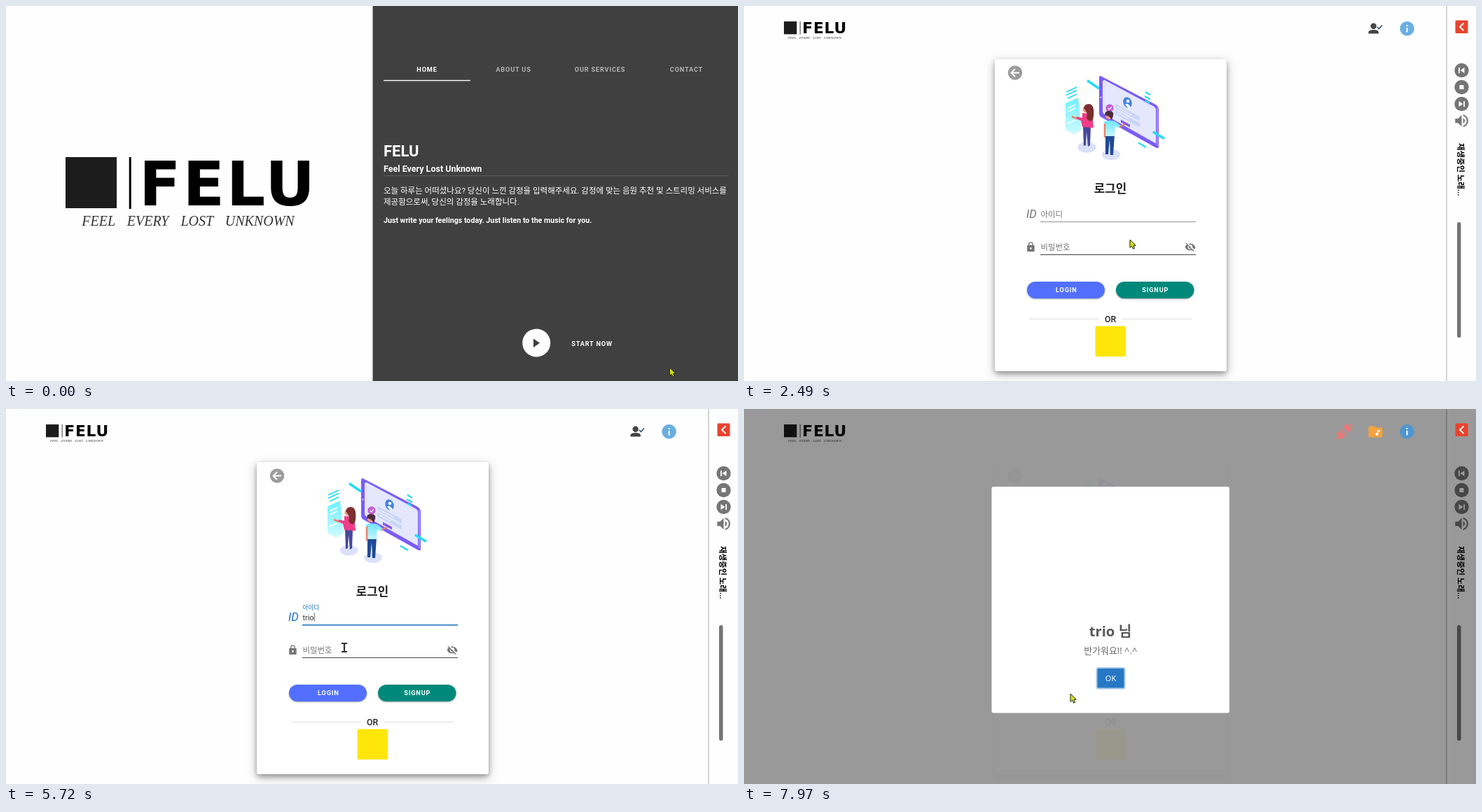
An HTML page that plays this animation: 1045x536 px, repeating every 8 s.

```html
<!DOCTYPE html>
<html lang="ko">
<head>
<meta charset="utf-8">
<title>Login walkthrough</title>
<style>
  html, body { margin: 0; width: 100%; height: 100%; overflow: hidden; background: #fefefe; }
  svg { display: block; width: 100%; height: 100%; }
  text { font-family: Roboto, "Noto Sans CJK KR", "Noto Sans CJK JP", sans-serif; white-space: pre; }
  .mid { text-anchor: middle; }
  .caps { font-size: 9.2px; font-weight: 700; letter-spacing: .089em; text-anchor: middle; fill: #fff; }
  .dim { fill: #b3b3b3; }
  .ko { font-size: 11.5px; }
  .label { font-size: 11.4px; }
  .typed { font-size: 10.8px; fill: #333; }
  .alert { font-family: "Noto Sans", "Noto Sans CJK KR", "Noto Sans CJK JP", sans-serif; text-anchor: middle; }
  .cyan { stroke: #22dcf5; fill: none; }
  #card { filter: drop-shadow(0 3px 3px rgba(0,0,0,.25)) drop-shadow(0 4px 7px rgba(0,0,0,.28)); }
  .btn { filter: drop-shadow(0 1px 1px rgba(0,0,0,.35)); }
</style>
</head>
<body>
<svg viewBox="0 0 1045 536" preserveAspectRatio="none">
  <defs>
    <linearGradient id="panel" x2="0" y2="1">
      <stop stop-color="#6cf0ff"/><stop offset="1" stop-color="#d2faff"/>
    </linearGradient>
    <linearGradient id="shirt" x2="0" y2="1">
      <stop stop-color="#6fe6fb"/><stop offset="1" stop-color="#c4f6fd"/>
    </linearGradient>
    <clipPath id="loginClip"><rect x="404" y="394" width="111" height="24" rx="12"/></clipPath>
    <g id="brand">
      <rect x="85" y="216" width="73" height="73" fill="#1c1c1c"/>
      <rect x="175.700" y="216" width="3" height="74"/>
      <text x="190" y="284.500" font-size="87" font-weight="700" letter-spacing="3"
        style="font-family:'DejaVu Sans',sans-serif">FELU</text>
      <text class="mid" x="260" y="314" font-size="20" font-style="italic" word-spacing="12" fill="#333"
        style="font-family:'Liberation Serif',serif">FEEL EVERY LOST UNKNOWN</text>
    </g>
  </defs>
  <rect width="1045" height="536" fill="#fefefe"/>

  <g id="landing">
    <use href="#brand"/>
    <rect x="523.500" y="-2" width="522" height="700" fill="#404040"/>
    <text class="caps" x="601" y="94">HOME</text>
    <text class="caps dim" x="724.500" y="94">ABOUT US</text>
    <text class="caps dim" x="848" y="94">OUR SERVICES</text>
    <text class="caps dim" x="971.500" y="94">CONTACT</text>
    <rect x="539" y="105.800" width="124" height="1.400" fill="#fff"/>
    <g fill="#fff">
      <text x="539" y="215" font-size="22" font-weight="700">FELU</text>
      <text x="539" y="237" font-size="12.500" font-weight="700">Feel Every Lost Unknown</text>
      <rect x="539" y="242" width="493" height="1" fill="#fff" opacity=".13"/>
      <text class="ko" x="539" y="267.500">오늘 하루는 어떠셨나요? 당신이 느낀 감정을 입력해주세요. 감정에 맞는 음원 추천 및 스트리밍 서비스를</text>
      <text class="ko" x="539" y="283.500">제공함으로써, 당신의 감정을 노래합니다.</text>
      <text x="539" y="310" font-size="10.650" font-weight="700">Just write your feelings today. Just listen to the music for you.</text>
      <circle cx="757.200" cy="481.500" r="20"/>
      <path d="M753 475.500v12.500l9-6.250z" fill="#404040"/>
    </g>
    <text class="caps" x="836.500" y="486.300">START NOW</text>
  </g>
  <path id="status" d="M0 533h111q3 0 3 3H0z" fill="#dedede"/>

  <g id="login">
    <rect id="card" x="358" y="76" width="331" height="446" rx="3" fill="#fff"/>
    <circle cx="387" cy="95.500" r="10.200" fill="#9c9c9c"/>
    <path d="M393 95.500H382M387 90l-5.500 5.500L387 101" fill="none" stroke="#fff" stroke-width="1.900"/>

    <g id="art">
      <g id="tablet">
        <path d="M510 100L587 140Q592 143 592 147V200Q592 204 588 202L511 159Q507 157 507 153V102Q507 98 510 100z" fill="#7a5cf5"/>
        <path d="M514 105L585 143Q588 145 588 148V196L515 155Q512 153 512 150V107z" fill="#e4e7fd"/>
        <path d="M590 145v54" stroke="#b4a5fb" stroke-width="1.500"/>
        <circle cx="509.500" cy="130" r="1" fill="#fff"/>
        <ellipse cx="547.500" cy="137.500" rx="6" ry="8" transform="rotate(-20 547.500 137.500)" fill="#4384e0"/>
        <circle cx="548" cy="135.500" r="2.300" fill="#fff"/>
        <path d="M544 140q4-3 8 4l-3 2z" fill="#fff"/>
        <path d="M530 139l35 19v6l-35-19zM530 148l35 19v6l-35-19z" fill="#c9d5f8"/>
        <path d="M533 144l20 11M533 152l16 9" stroke="#fff"/>
        <path d="M538 162l13 7v4l-13-7z" fill="#8457e8"/>
        <circle cx="522" cy="145.500" r="5.700" fill="#c45fd2"/>
        <path d="M519.500 145.500l2 2 3.500-4" fill="none" stroke="#fff" stroke-width="1.200"/>
      </g>
      <path class="cyan" stroke-width="3.500" d="M490 106.500l17 11.500M584 180l16 9.500"/>
      <path class="cyan" stroke-width="2.200" d="M573 123l7 4M572 129l8 4.500M573 135l6 3.500M563 195.500l11 6.500"/>
      <path class="cyan" stroke-width="1.800" d="M460 123l15-7M460 127.500l15-7M462 132l13-6"/>
      <g fill="#dbe0fb"><ellipse class="disc" cx="489.500" cy="202" rx="12" ry="7"/><ellipse class="disc" cx="524" cy="212.500" rx="12" ry="7"/></g>
      <path d="M459 139l18-8 5 46-11 7-12-7z" fill="url(#panel)"/>
      <path d="M462 146l11-5M462 151l11-5M462 168l11-5" stroke="#fff" stroke-width="1.500"/>
      <path d="M484 172h11l-1 27-3 2-2-21-1 19-3 1z" fill="#45479a"/>
      <path d="M483 153l14 1 2 20-16-1-2-9-7-3 1-3 8 2z" fill="#ef3d87"/>
      <path d="M475 161l-7-3" stroke="#e5856d" stroke-width="2.500"/>
      <circle cx="488" cy="148" r="4.500" fill="#f09c86"/>
      <path d="M485 146q1-6 7-6t7 8q1 6-1 15-5 4-9-3 2-6-1-10z" fill="#7d2f30"/>
      <path d="M516 184h13l-2 29h-4l-1-22-2 21h-4z" fill="#204a94"/>
      <path d="M514 165q8-3 16 0l8 6-2 4-6-3-1 14h-14z" fill="url(#shirt)"/>
      <path d="M536 173l8-4M515 168v20" stroke="#e5856d" stroke-width="2.500"/>
      <circle cx="521" cy="157" r="5" fill="#ee9680"/>
      <path d="M515 156q0-7 7-6t5 7l-2 6q-2-6-10-7z" fill="#4b2b3d"/>
    </g>

    <text class="mid" x="523" y="266.800" font-size="16.800" font-weight="700" fill="#222">로그인</text>

    <text id="idIcon" x="403" y="303.300" font-size="16.500" font-style="italic">ID</text>
    <text class="label" id="idLabel">아이디</text>
    <text class="typed" x="423.500" y="301.500" id="idText"><tspan></tspan><tspan></tspan></text>
    <path d="M423 308.500h222" stroke="#949494"/>
    <path id="idLine" stroke="#1b6fc0" stroke-width="1.600"/>

    <g id="pwIcons">
      <path transform="translate(401.500 336.500) scale(.66)" fill-rule="evenodd"
        d="M6 8h1V6a5 5 0 0 1 10 0v2h1a2 2 0 0 1 2 2v10a2 2 0 0 1-2 2H6a2 2 0 0 1-2-2V10a2 2 0 0 1 2-2zM9 8h6V6a3 3 0 0 0-6 0zM12 13a2 2 0 0 0 0 4 2 2 0 0 0 0-4z"/>
      <g transform="translate(629 336.500) scale(.66)">
        <path d="M1 12C3 7 7 4.500 12 4.500S21 7 23 12 17 19.500 12 19.500 3 17 1 12z"/>
        <circle cx="12" cy="12" r="5" fill="#fff"/><circle cx="12" cy="12" r="3"/>
        <path d="M4 2L22 20" stroke="#fff" stroke-width="2.500"/>
        <path d="M3.300 3L2 4.300 19.700 22 21 20.700z"/>
      </g>
    </g>
    <text class="label" id="pwLabel">비밀번호</text>
    <g id="dots"></g>
    <path id="pwRule" d="M423 355.500h222"/>
    <path id="pwLine" stroke="#1b6fc0" stroke-width="1.600"/>
    <rect id="caret" width=".8" height="12" fill="#333"/>

    <rect class="btn" id="loginBtn" x="404" y="394" width="111" height="24" rx="12"/>
    <circle id="ripple" cx="464.500" cy="406" fill="#fff" clip-path="url(#loginClip)"/>
    <text class="caps" x="460.400" y="409.300">LOGIN</text>
    <rect class="btn" x="531" y="394" width="111.500" height="24" rx="12" fill="#00897b"/>
    <text class="caps" x="587.300" y="409.300">SIGNUP</text>
    <path d="M407 447.500h99.500M540 447.500h99" stroke="#e0e0e0"/>
    <text class="mid" x="523.200" y="452.300" font-size="12.300" font-weight="500" fill="#222">OR</text>
    <rect x="501.500" y="457.500" width="43.500" height="43.500" rx="2" fill="#ffe60a"/>
  </g>

  <use id="smallBrand" href="#brand" transform="translate(35.700 -32.100) scale(.2507)"/>

  <g id="sidebar">
    <rect x="1003" width="42" height="536" fill="#fefefe"/>
    <rect x="1002.500" width="1" height="536" fill="#a8a8a8"/>
    <g fill="#757575">
      <circle cx="1024.500" cy="92" r="10.200"/><circle cx="1024.500" cy="116" r="10.200"/><circle cx="1024.500" cy="140" r="10.200"/>
      <path transform="translate(1012.200 151.700) scale(1.030)"
        d="M14 3.200v2.100a7 7 0 0 1 0 13.400v2.100a9 9 0 0 0 0-17.600M16.500 12a4.500 4.500 0 0 0-2.500-4v8a4.500 4.500 0 0 0 2.500-4M3 9v6h4l5 5V4L7 9z"/>
      <rect x="1018" y="309" width="5.500" height="165" rx="2.500"/>
    </g>
    <g fill="#fff">
      <path d="M1020 88h1.800v8H1020zM1028.500 88v8l-6-4z"/>
      <rect x="1021.500" y="113" width="6" height="6"/>
      <path d="M1027.200 136h1.800v8h-1.800zM1020.500 136v8l6-4z"/>
    </g>
    <text transform="translate(1019.200 196) rotate(90)" font-size="11.400" font-weight="700">재생중인 노래...</text>
  </g>

  <rect id="shade" width="1045" height="536" fill="#000"/>

  <g id="icons">
    <rect x="1015.500" y="20.500" width="18" height="18.500" rx="1.500" fill="#e8432e"/>
    <path d="M1027.500 24.500l-5.500 5.300 5.500 5.300" fill="none" stroke="#fff" stroke-width="2"/>
    <circle id="info" cx="946.600" cy="32.300" r="10.300"/>
    <path d="M945.600 27h2v2h-2zM945.600 31h2v6.500h-2z" fill="#fff"/>
    <g id="guest" fill="#454545">
      <circle cx="898.700" cy="28.800" r="4.200"/>
      <path d="M891.500 39.500v-2q0-3.500 7.200-3.500t7.200 3.500v2z"/>
      <path d="M904 30l2.500 2.500 4.500-5" fill="none" stroke="#3a5568" stroke-width="1.700"/>
    </g>
    <g id="member">
      <g transform="translate(856.500 32.300) rotate(-45) scale(1.080)" fill="#e57878">
        <path d="M-14 -1h4v2h-4zM10 -1h4v2h-4zM-10 -3q0-2 2-2h5v10h-5q-2 0-2-2zM10 -3q0-2-2-2H3v10h5q2 0 2-2zM-3 -3.500h4v2h-4zM-3 1.500h4v2h-4z"/>
      </g>
      <path d="M893.500 24.500h6l2 2h8q2 0 2 2v10q0 2-2 2h-16q-2 0-2-2v-12q0-2 2-2z" fill="#f2a340"/>
      <path d="M904 30h4v2h-2.500v4a2 2 0 1 1-1.500-2z" fill="#fff"/>
    </g>
  </g>

  <g id="dialog">
    <rect x="353.500" y="111" width="339.500" height="323.500" rx="3" fill="#fff"/>
    <text class="alert" x="523" y="324.500" font-size="20.300" font-weight="600" fill="#585858">trio 님</text>
    <text class="alert" x="523.300" y="349.700" font-size="12.900" fill="#666">반가워요!! ^.^</text>
    <rect x="503.500" y="370" width="40" height="29.500" rx="2.500" fill="#2778c4" stroke="#a8c8e6" stroke-width="2"/>
    <text class="alert" x="523.500" y="389.300" font-size="11" fill="#fff">OK</text>
  </g>

  <path id="arrow" d="M0 0V11.500L2.700 9.200 4.500 13.200 6.600 12.300 4.900 8.400 8.200 8.200z" fill="#d6e412" stroke="#222"/>
  <path id="beam" d="M-4 -6H4M-4 6H4M0 -6V6" fill="none" stroke="#333" stroke-width="2.200"/>
</svg>

<script>
const LOOP = 8000;
const $ = id => document.getElementById(id);
const set = (id, attrs) => { for (const k in attrs) $(id).setAttribute(k, attrs[k]); };
const show = (id, on) => { $(id).style.display = on ? '' : 'none'; };
const ramp = (t, from, span) => Math.min(1, Math.max(0, (t - from) / span));
const ease = p => 1 - (1 - p) ** 3;
const within = (t, a, b) => t >= a && t < b;
const mix = (p, on, off) => `color-mix(in srgb, ${on} ${p * 100}%, ${off})`;

const ROUTE = 1790, FADE_OUT = 1860, FADE_IN = 2190;
const ID_FOCUS = 2950, PW_FOCUS = 5950, CLICK = 7675, WELCOME = 7810;

// time, x, y
const pointer = [
  [0, 947.5, 517], [60, 947.5, 517], [230, 777, 468], [380, 777, 468], [720, 650, 229],
  [1150, 735, 366], [1220, 735, 366], [1400, 791, 462], [1470, 787.5, 474.5],
  [1940, 787.5, 474.5], [2440, 551, 334], [2600, 551, 334], [2920, 506, 298],
  [3100, 506, 298], [3350, 498, 312], [3480, 498, 312], [3900, 487, 340],
  [5080, 487, 340], [5650, 483, 341], [6000, 483, 341], [6650, 475, 386],
  [6800, 475, 386], [7450, 466, 407], [LOOP, 466, 407]
];
const idKeys = [
  [0, ''], [3250, 'ㅅ'], [3400, 'ㅅㄱ'], [3700, 'ㅅ'], [3850, ''],
  [4300, 't'], [4420, 'tr'], [4520, 'tri'], [4630, 'trio']
];
const pwKeys = [[0, ''], [6280, '•'], [6420, '••'], [6560, '•••'], [6700, '••••']];

const latest = (keys, t) => keys.filter(k => k[0] <= t).pop();

function pointerAt(t) {
  const i = pointer.findIndex(p => p[0] > t);
  const [t0, x0, y0] = pointer[i - 1], [t1, x1, y1] = pointer[i];
  const p = (t - t0) / (t1 - t0), s = p * p * (3 - 2 * p);
  return [x0 + (x1 - x0) * s, y0 + (y1 - y0) * s];
}

function drawField(name, y, lift, focus) {
  const color = mix(focus, '#1b6fc0', '#757575');
  set(name + 'Label', { transform: `translate(423.5 ${y - 7 - 15 * lift}) scale(${1 - 0.25 * lift})` });
  $(name + 'Label').style.fill = color;
  set(name + 'Line', { d: `M${534 - 111 * focus} ${y + 0.2}H${534 + 111 * focus}` });
  show(name + 'Line', focus > 0);
  return color;
}

function drawForm(t) {
  const idLift = ease(ramp(t, ID_FOCUS, 300)), pwLift = ease(ramp(t, PW_FOCUS, 300));
  const idColor = drawField('id', 308.5, idLift, idLift - pwLift);
  const pwColor = drawField('pw', 355.5, pwLift, pwLift - ease(ramp(t, CLICK, 300)));
  $('idIcon').style.fill = idColor;
  $('pwIcons').style.fill = pwColor;
  const hovered = within(t, FADE_IN, 2720) || within(t, 3720, PW_FOCUS);
  set('pwRule', { stroke: hovered ? '#444' : '#949494' });

  const [idTime, idValue] = latest(idKeys, t), [pwTime, pwValue] = latest(pwKeys, t);
  const [head, tail] = $('idText').children;
  head.textContent = idValue.slice(0, -1);
  tail.textContent = idValue.slice(-1);
  tail.style.textDecoration = idValue > 'z' ? 'underline' : 'none';
  $('dots').childNodes.forEach((dot, i) => { dot.style.display = i < pwValue.length ? '' : 'none'; });

  const inPw = t >= PW_FOCUS;
  const since = t - Math.max(inPw ? PW_FOCUS : ID_FOCUS, inPw ? pwTime : idTime);
  const width = inPw ? pwValue.length * 3.8 : idValue ? $('idText').getComputedTextLength() : 0;
  show('caret', within(t, ID_FOCUS, CLICK) && since % 1060 < 530);
  set('caret', { x: 423.8 + width, y: inPw ? 338 : 291.5 });

  $('loginBtn').style.fill = mix(ramp(t, 7250, 150), '#6a82ff', '#526fff');
  const wave = ramp(t, CLICK, 300);
  set('ripple', { r: 10 + 56 * wave, opacity: wave > 0 ? 0.2 * (1 - ramp(t, 7780, 200)) : 0 });
}

function drawArt(t) {
  const swing = Math.cos((t - 3800) / 3000 * 2 * Math.PI);
  set('tablet', { transform: `translate(0 ${-2.6 - 3.4 * swing})` });
  document.querySelectorAll('.disc').forEach(d => {
    d.setAttribute('rx', 12 - 1.3 * swing);
    d.setAttribute('ry', 7 - 0.7 * swing);
  });
}

function drawDialog(t) {
  const p = ramp(t, WELCOME, 150);
  const scale = p < 0.6 ? 0.7 + 0.35 * p / 0.6 : 1.05 - 0.05 * (p - 0.6) / 0.4;
  set('shade', { opacity: 0.4 * ramp(t, WELCOME, 100) });
  set('dialog', { transform: `translate(523 272.700) scale(${scale}) translate(-523 -272.700)`, opacity: ramp(t, WELCOME, 60) });
  show('dialog', t >= WELCOME);
}

function draw(t) {
  const routed = t >= ROUTE, welcomed = t >= WELCOME;
  set('landing', { transform: `translate(0 ${routed ? 103.6 : 0})`, opacity: 1 - ramp(t, FADE_OUT, 320) });
  show('landing', t < FADE_IN);
  show('sidebar', routed);
  show('icons', routed);
  show('smallBrand', t >= FADE_IN);
  show('guest', !welcomed);
  show('member', welcomed);
  set('info', { fill: welcomed ? '#5096d0' : '#6aaee2' });
  show('status', within(t, 390, 800) || within(t, 1440, 2100));

  show('login', t >= FADE_IN);
  set('login', { opacity: ease(ramp(t, FADE_IN, 340)) * (1 - 0.93 * ramp(t, WELCOME, 160)) });
  drawForm(t);
  drawArt(t);
  drawDialog(t);

  const [x, y] = pointerAt(t);
  const overText = within(t, 2800, 3200) || within(t, 3720, 6200);
  show('arrow', !overText);
  show('beam', overText);
  set(overText ? 'beam' : 'arrow', { transform: `translate(${x} ${y})` });
}

for (let i = 0; i < 4; i++) {
  const dot = document.createElementNS('http://www.w3.org/2000/svg', 'circle');
  for (const [k, v] of Object.entries({ cx: 425.3 + i * 3.8, cy: 344, r: 1.3, fill: '#222' })) dot.setAttribute(k, v);
  $('dots').append(dot);
}

const start = performance.now();
function tick() {
  draw((performance.now() - start) % LOOP);
  requestAnimationFrame(tick);
}
tick();
</script>
</body>
</html>
```
